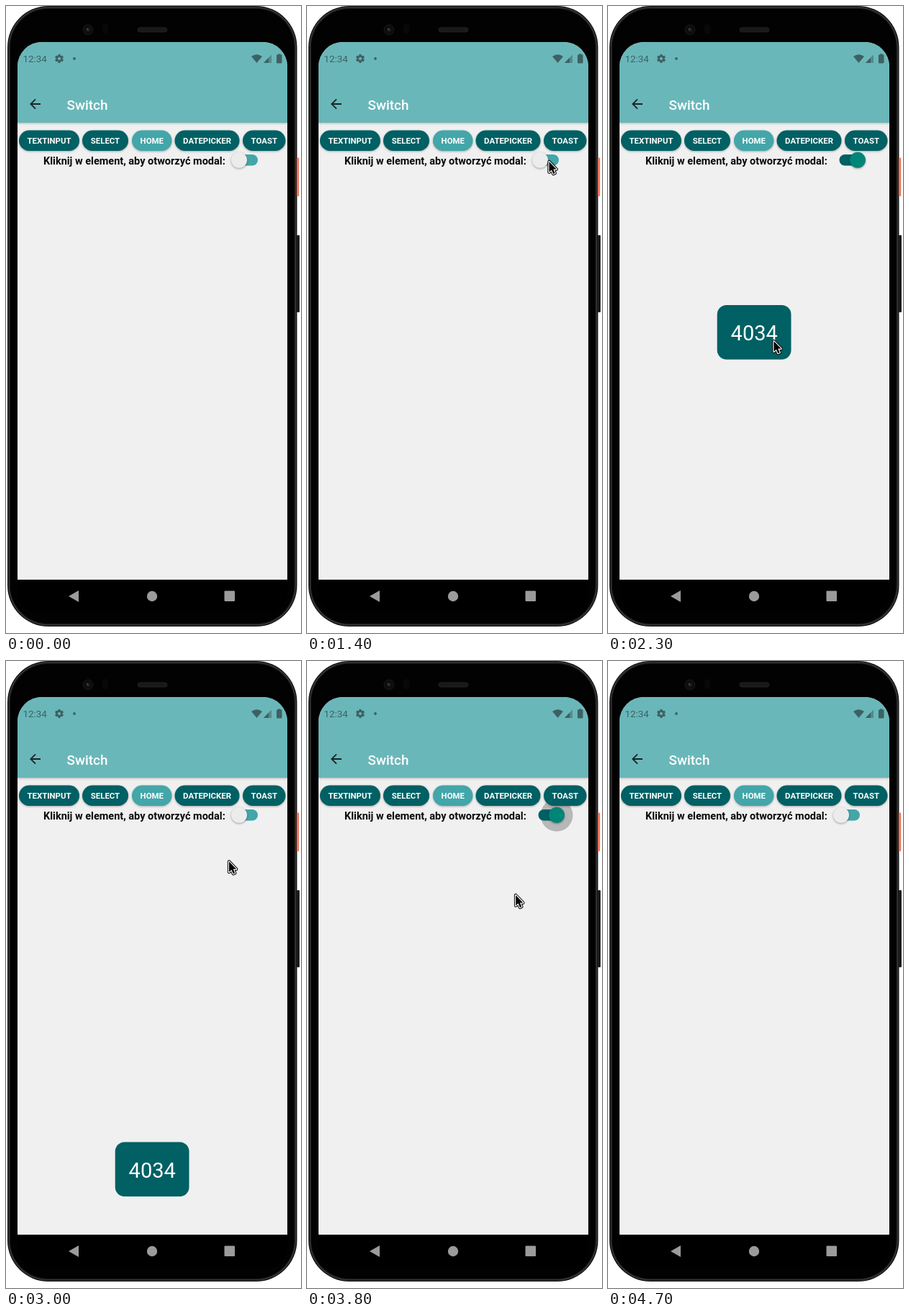
These frames come from a looping animation (410 px wide and 870 px high, 5.2 s). An HTML page with a canvas:

```html
<!DOCTYPE html>
<html lang="pl">
<head>
<meta charset="utf-8">
<title>Switch</title>
<style>
html, body { margin: 0; width: 100%; height: 100%; overflow: hidden; background: #fff; }
canvas { display: block; width: 410px; height: 870px; }
</style>
</head>
<body>
<canvas id="stage"></canvas>
<script>
const W = 410, H = 870, LOOP = 5200, STEP = 100;
const TEAL = '#006064', LIGHT = '#43a6a9', HEADER = '#6ab7ba', PAPER = '#f0f0f0';
const MODAL_Y = 415;
const canvas = document.getElementById('stage');
const ctx = canvas.getContext('2d');
const dpr = window.devicePixelRatio || 1;
canvas.width = W * dpr;
canvas.height = H * dpr;

// Each round: the switch is pressed, the modal drops in, is closed and leaves.
const rounds = [
  { press: 1400, drop: 1500, close: 2800, gone: 3100 },
  { press: 3600, drop: 3800, close: 4200, gone: 4400 }
];

const entry = { x: 400, y: 470 }, exit = { x: 420, y: 285 };
const toggle = { x: 335, y: 214 }, modalSpot = { x: 229, y: 463 };
const journeys = [
  { from: 100, to: 700, goal: { x: 359, y: 249 } },
  { from: 700, to: 1100, goal: toggle },
  { from: 1800, to: 2300, goal: modalSpot },
  { from: 2800, to: 3200, goal: toggle },
  { from: 3700, to: 4100, goal: modalSpot },
  { from: 4200, to: 4700, goal: exit }
];

const clamp = v => Math.min(1, Math.max(0, v));
const easeOut = k => 1 - (1 - k) ** 2;

function cursorAt(t) {
  let { x, y } = entry;
  for (const { from, to, goal } of journeys) {
    const k = easeOut(clamp((t - from) / (to - from)));
    x += (goal.x - x) * k;
    y += (goal.y - y) * k;
  }
  return { x, y };
}

// Damped swing into place, then a short pull back before falling out.
function modalAt(t, { drop, close }) {
  if (t < close) {
    const age = t - drop;
    return MODAL_Y - 440 * Math.exp(-age / 76) * Math.cos(age * Math.PI / 320);
  }
  const u = (t - close) / 200;
  return MODAL_Y + 252.5 * u * u * (2.3 * u - 1.3);
}

const thumbAt = t => rounds.reduce((sum, { press, close }) =>
  sum + clamp((t - press) / 200) - clamp((t - close) / 200), 0);

const rippleAt = t => rounds.reduce((sum, { press }) =>
  sum + 0.24 * clamp((t - press) / 100) * clamp((press + 500 - t) / 300), 0);

function box(x, y, w, h, r, fill, stroke, line) {
  ctx.beginPath();
  ctx.roundRect(x, y, w, h, r);
  paint(fill, stroke, line);
}

function disc(x, y, r, fill, stroke, line) {
  ctx.beginPath();
  ctx.arc(x, y, r, 0, Math.PI * 2);
  paint(fill, stroke, line);
}

function poly(points, fill) {
  ctx.beginPath();
  points.forEach(([x, y]) => ctx.lineTo(x, y));
  ctx.closePath();
  paint(fill);
}

function paint(fill, stroke, line = 1) {
  if (fill) { ctx.fillStyle = fill; ctx.fill(); }
  if (stroke) { ctx.strokeStyle = stroke; ctx.lineWidth = line; ctx.stroke(); }
}

function text(str, x, y, size, weight, color, align = 'left') {
  ctx.font = `${weight} ${size}px Roboto, sans-serif`;
  ctx.textAlign = align;
  ctx.fillStyle = color;
  ctx.fillText(str, x, y);
}

function shadowed(color, blur, dy, draw) {
  ctx.save();
  ctx.shadowColor = color;
  ctx.shadowBlur = blur * dpr;
  ctx.shadowOffsetY = dy * dpr;
  draw();
  ctx.restore();
}

function drawPhone() {
  // nested shells, from the outer edge inwards
  ['#0d0d0d', '#3c3c3c', '#1c1c1c', '#020202'].forEach((shade, i) => {
    const inset = i * 1.3;
    box(2 + inset, inset, 402.5 - 2 * inset, 861 - 2 * inset, 57 - inset, shade);
  });
  box(404, 210.5, 3.2, 53.5, 1, '#ef7358');
  box(404, 318, 4, 107, 1, '#1b1b1b');
  disc(114, 33, 7, '#0d0d0d', '#191919');
  disc(114, 33, 2.5, '#222');
  disc(113, 32, 0.9, '#555');
  box(134, 25, 8, 14, 4, '#080808');
  box(183, 30, 41, 6, 3, '#191919', '#222');
}

function drawStatusBar() {
  const ink = '#3d6163';
  text('12:34', 23.5, 78, 13.4, 400, ink);
  ctx.save();
  ctx.translate(74, 73);
  for (let i = 0; i < 6; i++) {
    ctx.rotate(Math.PI / 3);
    ctx.fillStyle = ink;
    ctx.fillRect(-1.6, -6, 3.2, 3);
  }
  disc(0, 0, 3.3, null, ink, 2.6);
  ctx.restore();
  disc(95, 73, 1.9, ink);
  ctx.beginPath();
  ctx.moveTo(348.5, 79);
  ctx.lineTo(341, 70);
  ctx.quadraticCurveTo(348.5, 64.5, 356, 70);
  ctx.closePath();
  paint(ink);
  poly([[358, 79], [369, 79], [369, 67.5]], 'rgba(54,83,84,.45)');
  poly([[358, 79], [365, 79], [365, 71.7]], ink);
  ctx.fillRect(378, 66.5, 3.5, 2);
  box(376, 67.5, 7.5, 12, 1, ink);
}

function drawHeader() {
  shadowed('rgba(0,0,0,.25)', 3, 1, () => {
    ctx.fillStyle = HEADER;
    ctx.fillRect(16, 50, 375, 112);
  });
  drawStatusBar();
  ctx.beginPath();
  ctx.moveTo(48, 136);
  ctx.lineTo(34.5, 136);
  ctx.moveTo(41, 129.3);
  ctx.lineTo(34.3, 136);
  ctx.lineTo(41, 142.7);
  paint(null, '#1c2424', 1.8);
  text('Switch', 84.5, 143.5, 18.9, 500, '#fff');
}

function drawButtons() {
  [['TEXTINPUT', 18, 84], ['SELECT', 106, 64], ['HOME', 175, 55.5],
   ['DATEPICKER', 234.5, 90], ['TOAST', 329, 59.5]].forEach(([name, x, w]) => {
    shadowed('rgba(0,0,0,.3)', 3, 1, () =>
      box(x, 172.5, w, 28.5, 14.25, name === 'HOME' ? LIGHT : TEAL));
    text(name, x + w / 2, 191.2, 11.4, 700, '#fff', 'center');
  });
}

function drawSwitch(on, ripple) {
  if (ripple > 0) disc(347, 214, 22.5, `rgba(0,0,0,${ripple})`);
  box(321.5, 206, 28.5, 15.5, 7.75, on > 0.5 ? TEAL : LIGHT);
  shadowed('rgba(0,0,0,.35)', 3, 1, () =>
    disc(324 + 23 * on, 213.8, 11, on > 0.5 ? '#008577' : '#ececec'));
}

function drawModal(y) {
  box(151.7, y, 102.8, 75.5, 13, TEAL);
  text('4034', 203.2, y + 49, 29, 400, '#fff', 'center');
}

function drawNavBar() {
  const grey = '#9b9b9b';
  box(16, 796, 375, 46, [0, 0, 28, 28], '#000');
  poly([[87, 819], [101, 811], [101, 827]], grey);
  disc(203, 819, 7.2, grey);
  box(303.5, 811.5, 14.5, 14.5, 1, grey);
}

function drawCursor({ x, y }) {
  ctx.save();
  ctx.translate(x + 1.5, y + 2);
  ctx.lineJoin = 'round';
  poly([[0, 0], [0, 14.5], [3.4, 11.4], [5.8, 17], [8.2, 16], [5.8, 10.5], [10.2, 10.5]]);
  paint(null, '#000', 4.4);
  paint(null, '#fff', 2.4);
  paint('#000');
  ctx.restore();
}

function draw(t) {
  ctx.setTransform(dpr, 0, 0, dpr, 0, 0);
  ctx.fillStyle = '#fff';
  ctx.fillRect(0, 0, W, H);
  drawPhone();

  ctx.save();
  ctx.beginPath();
  ctx.roundRect(16, 50, 375, 746, [34, 34, 0, 0]);
  ctx.clip();
  ctx.fillStyle = PAPER;
  ctx.fillRect(16, 50, 375, 746);
  drawHeader();
  text('Kliknij w element, aby otworzyć modal:', 52, 220, 14.5, 700, '#0a0a0a');
  drawSwitch(thumbAt(t), rippleAt(t));
  drawButtons();
  const round = rounds.find(r => t > r.drop && t < r.gone);
  if (round) drawModal(modalAt(t, round));
  ctx.restore();

  drawNavBar();
  if (t > 100 && t < 4700) drawCursor(cursorAt(t));
}

const start = performance.now();
function tick() {
  const t = (performance.now() - start) % LOOP;
  draw(Math.floor(t / STEP) * STEP);
  requestAnimationFrame(tick);
}
tick();
</script>
</body>
</html>
```
